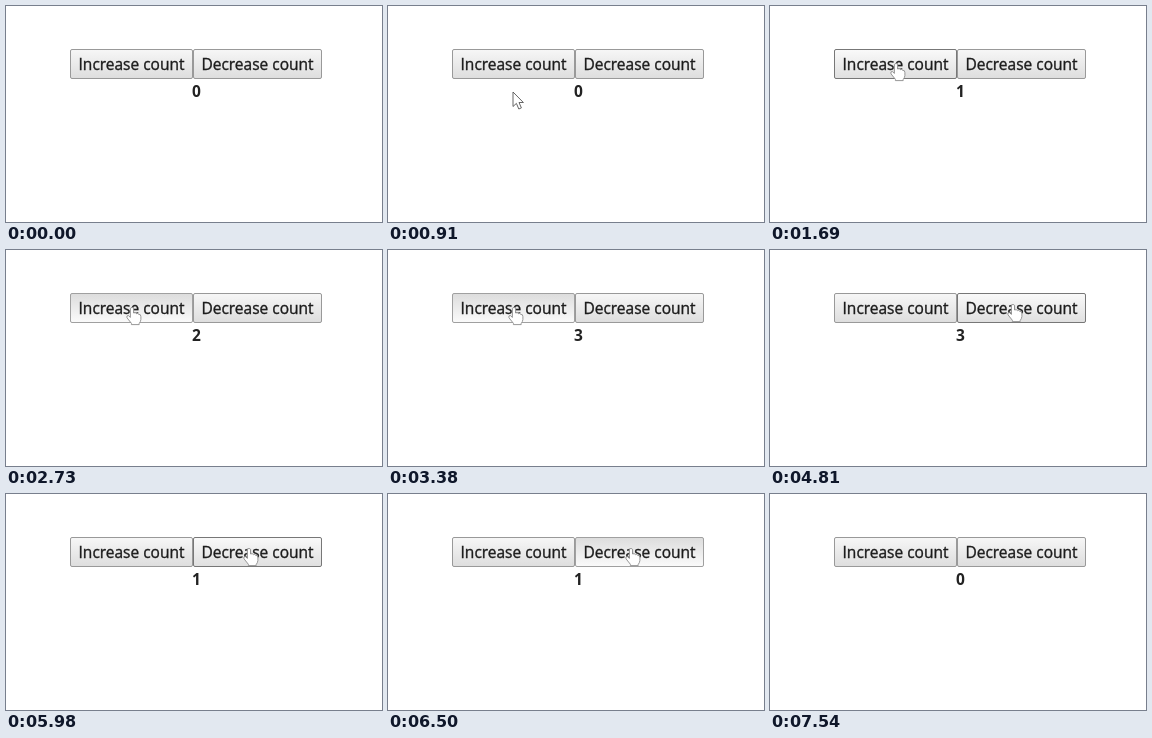
An HTML page with a canvas for the animation above (7.8 s loop, 376 by 216 pixels).

```html
<!DOCTYPE html>
<html lang="en">
<head>
<meta charset="utf-8">
<title>Counter</title>
<style>
  html, body { margin: 0; width: 100%; height: 100%; overflow: hidden; background: #fff; }
  canvas { display: block; }
</style>
</head>
<body>
<canvas id="stage" width="376" height="216"></canvas>
<script>
const ctx = document.getElementById('stage').getContext('2d');
const LOOP = 7800, TICK = 130;
const TOP = 43, HEIGHT = 30;
const CLICKS = 4, CLICK_GAP = 5 * TICK;
const FONT = '15.5px "Open Sans", "Noto Sans", sans-serif';

const buttons = [
  { x: 64, w: 123, label: 'Increase count', step: 1, firstClick: 11 * TICK },
  { x: 187, w: 129, label: 'Decrease count', step: -1, firstClick: 35 * TICK }
];

// Pointer stops, eased between
const stops = [
  { t: 390, x: 112, y: 186 },
  { t: 650, x: 125, y: 91 },
  { t: 780, x: 125, y: 91 },
  { t: 1300, x: 126, y: 57 },
  { t: 3510, x: 126, y: 57 },
  { t: 4160, x: 243, y: 54 },
  { t: 6760, x: 243, y: 54 },
  { t: 7540, x: 40, y: 216 }
];

const hand = new Path2D(
  'M-1.6 1.4 Q0 -.8 1.6 1.4 V6 Q3.4 5 4.4 6.6 Q5.8 5.8 6.8 7.4 ' +
  'Q8.9 7 8.9 9.6 V12.5 Q8.6 14.8 7.2 16.5 V17.6 H-.6 V16.3 ' +
  'L-5 10.8 Q-5.7 8.5 -3.8 8.4 L-1.6 10.4 Z');
const arrow = new Path2D('M0 0 V14.5 L3.4 11.4 L5.8 17 L8.4 15.9 L6 10.5 H10.4 Z');

const smooth = p => p * p * (3 - 2 * p);
const mix = (a, b, p) => a + (b - a) * p;

function pointerAt(t) {
  const i = stops.findIndex(s => s.t > t);
  if (i < 1) return null;
  const a = stops[i - 1], b = stops[i];
  const p = smooth((t - a.t) / (b.t - a.t));
  return { x: Math.round(mix(a.x, b.x, p)), y: Math.round(mix(a.y, b.y, p)) };
}

function isOver(b, p) {
  return p && p.x >= b.x && p.x < b.x + b.w && p.y >= TOP && p.y < TOP + HEIGHT;
}

function isPressed(b, t) {
  const since = t - b.firstClick;
  return since >= 0 && since < CLICKS * CLICK_GAP && since % CLICK_GAP < TICK;
}

// A click counts when the button is released
function clicksBy(b, t) {
  const done = Math.floor((t - b.firstClick - TICK) / CLICK_GAP) + 1;
  return Math.min(CLICKS, Math.max(0, done));
}

function drawButton(b, hover, pressed) {
  const fill = ctx.createLinearGradient(0, TOP, 0, TOP + HEIGHT);
  const [from, to] = pressed ? ['#dcdcdc', '#fbfbfb']
    : hover ? ['#fafafa', '#dfdfdf'] : ['#f7f7f7', '#dddddd'];
  fill.addColorStop(0, from);
  fill.addColorStop(1, to);
  ctx.beginPath();
  ctx.roundRect(b.x + 0.5, TOP + 0.5, b.w - 1, HEIGHT - 1, 1.5);
  ctx.fillStyle = fill;
  ctx.fill();
  ctx.lineWidth = 1;
  ctx.strokeStyle = pressed ? '#a0a0a0' : hover ? '#777' : '#999';
  ctx.stroke();

  // A hairline outline gives the label its medium weight
  const middle = b.x + b.w / 2;
  ctx.font = FONT;
  ctx.fillStyle = ctx.strokeStyle = '#1c1c1c';
  ctx.lineWidth = 0.35;
  ctx.fillText(b.label, middle, 64);
  ctx.strokeText(b.label, middle, 64);
}

function drawPointer(p, overButton) {
  const shape = overButton ? hand : arrow;
  ctx.save();
  ctx.translate(p.x, p.y);
  ctx.lineJoin = 'round';
  ctx.lineWidth = 0.9;
  ctx.fillStyle = '#fff';
  ctx.strokeStyle = overButton ? '#8c8c8c' : '#555';
  ctx.fill(shape);
  ctx.stroke(shape);
  ctx.restore();
}

function draw(t) {
  const p = pointerAt(t);
  ctx.fillStyle = '#fff';
  ctx.fillRect(0, 0, 376, 216);
  ctx.textAlign = 'center';
  let count = 0;
  for (const b of buttons) {
    drawButton(b, isOver(b, p), isPressed(b, t));
    count += b.step * clicksBy(b, t);
  }
  ctx.font = 'bold ' + FONT;
  ctx.fillStyle = '#222';
  ctx.fillText(count, 190.5, 91);
  if (p) drawPointer(p, buttons.some(b => isOver(b, p)));
}

const start = performance.now();
function frame() {
  const t = (performance.now() - start) % LOOP;
  draw(Math.floor(t / TICK) * TICK);
  requestAnimationFrame(frame);
}
frame();
</script>
</body>
</html>
```
